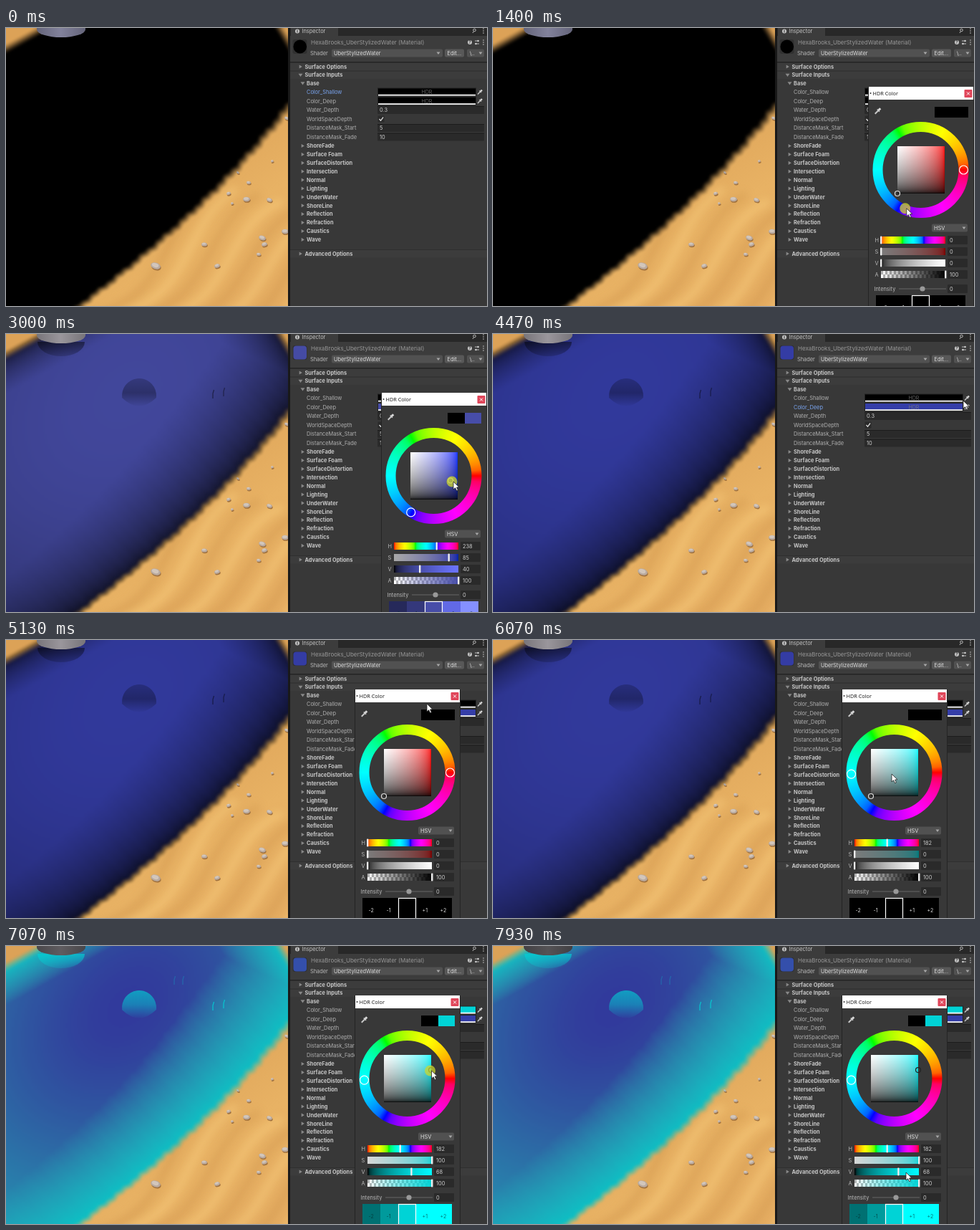
These frames come from a looping animation (672 px wide and 388 px high, 8000 ms). An HTML page with a canvas:

```html
<!DOCTYPE html>
<html lang="en">
<head>
<meta charset="utf-8">
<title>Water material</title>
<style>
html, body { margin: 0; width: 100%; height: 100%; overflow: hidden; background: #383838; }
canvas { display: block; }
</style>
</head>
<body>
<canvas id="stage" width="672" height="388"></canvas>
<script>
const LOOP = 8;
const VIEW_W = 396, H = 388;
const g = document.getElementById('stage').getContext('2d');

// Keys are [time, value...]; values ease between neighbours and hold at the ends.
function track(t, keys) {
  if (t <= keys[0][0]) return keys[0].slice(1);
  for (let i = 1; i < keys.length; i++) {
    const a = keys[i - 1], b = keys[i];
    if (t < b[0]) return mix(a.slice(1), b.slice(1), smooth((t - a[0]) / (b[0] - a[0])));
  }
  return keys[keys.length - 1].slice(1);
}
const clamp = v => Math.min(1, Math.max(0, v));
const smooth = v => { v = clamp(v); return v * v * (3 - 2 * v); };
const mix = (a, b, p) => a.map((v, i) => v + (b[i] - v) * p);

// Colours are linear light; css() converts them for display.
const hsv = (h, s, v) => [5, 3, 1].map(n => {
  const k = (n + h / 60) % 6;
  return v - v * s * Math.max(0, Math.min(k, 4 - k, 1));
});
const encode = v => clamp(v) ** (1 / 2.2);
const toByte = v => Math.round(255 * encode(v));
const css = (c, a = 1) => `rgba(${c.map(toByte)},${a})`;

// Drawing helpers
function rect(x, y, w, h, fill, r = 0) {
  g.fillStyle = fill;
  g.beginPath();
  g.roundRect(x, y, w, h, r);
  g.fill();
}
function frame(x, y, w, h, color, width = 1) {
  g.strokeStyle = color;
  g.lineWidth = width;
  g.strokeRect(x, y, w, h);
}
function text(s, x, y, color = '#b8b8b8', size = 7.4, weight = 400, family = 'Inter') {
  g.font = `${weight} ${size}px ${family}, sans-serif`;
  g.textBaseline = 'middle';
  g.fillStyle = color;
  g.fillText(s, x, y + .5);
}
function line(points, color, width = 1) {
  g.strokeStyle = color;
  g.lineWidth = width;
  g.beginPath();
  points.forEach(([x, y]) => g.lineTo(x, y));
  g.stroke();
}
function poly(points, fill) {
  g.fillStyle = fill;
  g.beginPath();
  points.forEach(([x, y]) => g.lineTo(x, y));
  g.fill();
}
function ring(x, y, r, color, width) {
  g.strokeStyle = color;
  g.lineWidth = width;
  g.beginPath();
  g.arc(x, y, r, 0, 7);
  g.stroke();
}
function disc(x, y, r, fill) {
  g.fillStyle = fill;
  g.beginPath();
  g.arc(x, y, r, 0, 7);
  g.fill();
}
function gradient(x0, y0, x1, y1, colors) {
  const grad = g.createLinearGradient(x0, y0, x1, y1);
  colors.forEach((c, i) => grad.addColorStop(i / (colors.length - 1), c));
  return grad;
}
// Evenly spaced samples of a colour function over 0..1
const ramp = (colorAt, n = 24) => Array.from({ length: n + 1 }, (_, i) => colorAt(i / n));
const down = (x, y, s = 2.5, c = '#a8a8a8') => poly([[x - s, y - s * .6], [x + s, y - s * .6], [x, y + s * .8]], c);
const right = (x, y) => poly([[x - 1.8, y - 2.6], [x + 2.4, y], [x - 1.8, y + 2.6]], '#888');
function dropper(x, y, s = 1) {
  line([[x - 3 * s, y + 3 * s], [x + s, y - s]], '#c8c8c8', 1.5 * s);
  line([[x - .6 * s, y - 2 * s], [x + 2 * s, y + .6 * s]], '#d0d0d0', 1.2 * s);
  line([[x + s, y - s], [x + 3 * s, y - 3 * s]], '#d8d8d8', 2.4 * s);
}

// Beach, drawn once
function makeSand() {
  const c = document.createElement('canvas');
  c.width = VIEW_W; c.height = H;
  const s = c.getContext('2d');
  const base = s.createLinearGradient(230, 150, 390, 388);
  base.addColorStop(0, '#dca257');
  base.addColorStop(.5, '#e8b264');
  base.addColorStop(1, '#e5ad62');
  s.fillStyle = base;
  s.fillRect(0, 0, VIEW_W, H);
  s.filter = 'blur(6px)';
  for (let i = 0; i < 9; i++) {
    s.strokeStyle = i % 2 ? 'rgba(255,214,135,.4)' : 'rgba(190,130,62,.28)';
    s.lineWidth = 10;
    s.beginPath();
    s.moveTo(120 + i * 38, 400);
    s.bezierCurveTo(235 + i * 26, 375, 215 + i * 32, 270, 290 + i * 32, 215 + i * 9);
    s.stroke();
  }
  s.filter = 'none';
  const shells = [[372, 186, 2], [339, 216, 3], [324, 202, 2], [311, 231, 3], [336, 239, 5], [368, 240, 4],
    [316, 245, 2], [277, 302, 4], [209, 332, 7], [295, 332, 4], [353, 316, 3], [358, 293, 5],
    [361, 302, 4], [390, 284, 5], [392, 126, 3]];
  shells.forEach(([x, y, r], i) => {
    for (const [dy, fill] of [[1.6, '#a0723f'], [0, '#b9aaa0'], [-1, '#d2c6bb']]) {
      s.fillStyle = fill;
      s.beginPath();
      s.ellipse(x + dy * .5, y + dy, r * (dy < 0 ? .7 : 1), r * (dy < 0 ? .4 : .65), i % 3 * .3 - .3, 0, 7);
      s.fill();
    }
  });
  return c;
}
const sand = makeSand();

// Water at half size: depth and coverage are fixed, only the colours change.
const waterCanvas = document.createElement('canvas');
waterCanvas.width = VIEW_W / 2; waterCanvas.height = H / 2;
const waterCtx = waterCanvas.getContext('2d');
const waterImage = waterCtx.createImageData(VIEW_W / 2, H / 2);
const depth = new Uint8Array(VIEW_W * H / 4);
for (let i = 0; i < depth.length; i++) {
  const x = i % (VIEW_W / 2) * 2 + 1, y = Math.floor(i / (VIEW_W / 2)) * 2 + 1;
  const dy = y - 112;
  const shoreX = 395 - .764 * dy - .00104 * dy * Math.max(0, dy);
  const wobble = .7 * Math.sin((x - y) / 3.3) + .9 * Math.sin((x - y) / 9);
  const near = (shoreX - x) * .72 + wobble;
  const far = (y - 28 + .55 * x) * .87;
  const side = (383 + .6 * y - x) * .86;
  const edge = Math.min(near, far, side);
  const along = ((x - 170) * .716 - (y - 85) * .698) / 400;
  const across = ((x - 170) * .698 + (y - 85) * .716) / 290;
  const bank = clamp(Math.min(near, far * 2.5, side * 1.6) / 120) ** .8;
  depth[i] = 255 * bank * (1 - .6 * clamp(along * along + across * across));
  waterImage.data[i * 4 + 3] = 255 * smooth((edge + 7) / 16);
}
function drawWater(shallow, deep) {
  const colors = ramp(p => mix(shallow, deep, p).map(v => toByte(v * .84)), 255);
  const px = waterImage.data;
  for (let i = 0; i < depth.length; i++) {
    const c = colors[depth[i]];
    px[i * 4] = c[0]; px[i * 4 + 1] = c[1]; px[i * 4 + 2] = c[2];
  }
  waterCtx.putImageData(waterImage, 0, 0);
  g.drawImage(waterCanvas, 0, 0, VIEW_W, H);
}

function drawScene(t, shallow, deep) {
  g.drawImage(sand, 0, 0);
  drawWater(shallow, deep);
  const tint = a => css(shallow, a);
  const lit = clamp(shallow[2] * 2);

  // Submerged part of the post, ball and reeds
  g.fillStyle = gradient(0, 8, 0, 32, [tint(.5 + .25 * lit), tint(.15)]);
  g.beginPath();
  g.ellipse(77, 11, 33, 20, 0, 0, Math.PI);
  g.fill();
  g.fillStyle = gradient(0, 62, 0, 102, [tint(.2 + .45 * lit), tint(.32 + .13 * lit), tint(0)]);
  g.beginPath();
  g.arc(186, 86, 24, Math.PI * .96, Math.PI * 2.04);
  g.quadraticCurveTo(186, 112, 162, 89);
  g.fill();
  for (const [x, y, a] of [[289, 78, .45 + .35 * lit], [304, 75, .4 + .4 * lit], [235, 42, .25 * lit], [247, 42, .25 * lit]])
    line([[x + 1.5, y], [x, y + 5], [x, y + 12]], tint(a), 1.3);

  // Post above the water
  const [shade] = track(t, [[2, 0], [2.6, 1], [6.1, 1], [6.4, 2.2], [7.9, 2.6]]);
  const tone = k => shade < 1 ? `rgb(${[118 + 22 * shade, 118 + 18 * shade, 142].map(v => v * k)})`
    : `rgb(${[140, 136, 142].map(v => v * k * (1.28 - .28 * shade))})`;
  g.fillStyle = gradient(42, 0, 111, 0, [tone(.85), tone(1.1), tone(.85)]);
  g.beginPath();
  g.ellipse(77, 2, 34, 11, 0, 0, Math.PI);
  g.lineTo(43, 0);
  g.lineTo(111, 0);
  g.fill();
}

const groups = ['ShoreFade', 'Surface Foam', 'SurfaceDistortion', 'Intersection', 'Normal', 'Lighting',
  'UnderWater', 'ShoreLine', 'Reflection', 'Refraction', 'Caustics', 'Wave'];

function drawInspector(t, shallow, deep, focus) {
  rect(394, 0, 278, H, '#383838');
  rect(394, 0, 278, 11, '#282828');
  rect(398, 0, 66, 12, '#3c3c3c');
  rect(397, 11, 275, 36, '#3c3c3c');
  rect(397, 47, 275, 1, '#252525');
  rect(394, 0, 3, H, '#191919');
  disc(407, 4.5, 3, '#c4c4c4');
  rect(406.5, 2.5, 1, 4, '#333');
  text('Inspector', 413.5, 4, '#c4c4c4');
  ring(654.5, 3, 1.8, '#bbb', 1);
  line([[653.5, 4.5], [652, 7]], '#bbb');
  for (const [x, y] of [[667, 4], [667, 20]])
    for (const d of [-3, 0, 3]) disc(x, y + d, .8, '#c4c4c4');

  // Header
  rect(400.5, 16, 20, 20, '#303030', 3);
  rect(401.5, 16.5, 18.5, 19, css(mix(shallow, deep, .95)), t > 2.7 ? 4 : 9.5);
  text('HexaBrooks_UberStylizedWater (Material)', 426, 20, '#989898', 8);
  disc(648, 20, 3, '#c4c4c4');
  text('?', 646.3, 20, '#383838', 6, 700);
  for (const y of [18, 22]) line([[655, y], [661, y]], '#bbb');
  disc(659.5, 18, 1.2, '#ccc');
  disc(656.5, 22, 1.2, '#ccc');
  text('Shader', 425, 35);
  rect(455, 29.5, 155, 11, '#515151', 2);
  text('UberStylizedWater', 458, 35, '#dcdcdc');
  down(604, 35);
  rect(613, 29.5, 27, 11, '#585858', 2);
  text('Edit...', 616.5, 35, '#e0e0e0');
  rect(644, 29.5, 24, 11, '#515151', 2);
  text('\\..', 648, 35, '#e0e0e0');
  down(663, 35);

  // Foldouts
  const bold = (s, x, y) => text(s, x, y, '#c6c6c6', 7.4, 700);
  for (const y of [54, 65.5, 315]) {
    rect(397, y - 5.5, 275, 11, '#3c3c3c');
    rect(397, y - 6, 275, 1, '#2e2e2e');
  }
  right(411.5, 54);
  bold('Surface Options', 417.5, 54);
  down(411.5, 65.5, 3, '#888');
  bold('Surface Inputs', 417.5, 65.5);
  down(414.5, 77, 3, '#888');
  bold('Base', 420, 77);
  groups.forEach((name, i) => {
    const y = 164.5 + i * 11.9;
    right(414.5, y);
    bold(name, 420, y);
  });
  right(411.5, 315);
  bold('Advanced Options', 417.5, 315);

  // Properties
  [['Color_Shallow', shallow], ['Color_Deep', deep]].forEach(([name, color], i) => {
    const y = 89.5 + i * 12.5;
    text(name, 420, y, focus === i ? '#7aa5f0' : '#b0b0b0');
    rect(519, y - 6, 138, 12, '#222');
    rect(520, y - 5, 136, 8.5, css(color));
    rect(520, y + 3.3, 136, 1.8, '#fff');
    text('HDR', 580.5, y, 'rgba(128,128,128,.8)', 7);
    dropper(662, y);
  });
  [['Water_Depth', '0.3'], ['WorldSpaceDepth'], ['DistanceMask_Start', '5'], ['DistanceMask_Fade', '10']].forEach(([name, value], i) => {
    const y = 114.5 + i * 12.5;
    text(name, 420, y, '#b0b0b0');
    if (value) {
      rect(519, y - 5.5, 149, 11, '#2a2a2a', 1);
      rect(519, y - 5.5, 149, 1, '#1c1c1c');
      text(value, 522, y, '#d0d0d0');
    } else {
      rect(519.5, y - 4.5, 9, 9, '#2a2a2a', 1);
      line([[521.5, y], [523.5, y + 2.3], [527, y - 2.5]], '#ddd', 1.3);
    }
  });
}

const rainbow = ramp(p => css(hsv(360 * p, 1, 1)), 48);
const darken = ramp(p => `rgba(0,0,0,${1 - encode(1 - p)})`, 48);

function drawPicker(hue, s, v, old) {
  const color = hsv(hue, s, v);
  rect(-1, 0, 148, 340, '#242424');
  rect(0, 0, 146, 340, '#383838');
  rect(0, 0, 146, 18, '#fff');
  disc(2.5, 9, 1, '#333');
  text('HDR Color', 5.5, 9, '#222', 7.3, 400, 'Noto Sans');
  rect(133.5, 4, 11, 11, '#e0465a', 1);
  line([[137, 7.5], [141, 11.5]], '#fff');
  line([[141, 7.5], [137, 11.5]], '#fff');

  dropper(12.5, 34, 1.25);
  rect(92, 28, 24, 15, css(old));
  rect(116, 28, 23, 15, css(color));

  // Hue ring and saturation/value square
  const wheel = g.createConicGradient(0, 72.5, 116);
  rainbow.forEach((c, i) => wheel.addColorStop(1 - i / (rainbow.length - 1), c));
  ring(72.5, 116, 60, wheel, 14);
  const a = hue * Math.PI / 180;
  ring(72.5 + 60 * Math.cos(a), 116 - 60 * Math.sin(a), 6, '#fff', 1.2);
  rect(40, 83, 66, 66, gradient(40, 0, 106, 0, ramp(p => css(hsv(hue, p, 1)), 48)));
  rect(40, 83, 66, 66, gradient(0, 83, 0, 149, darken));
  ring(40 + 66 * s, 149 - 66 * v, 3.5, v > .5 ? '#222' : '#ddd', 1.2);

  rect(88, 191.5, 50, 11, '#515151', 2);
  text('HSV', 91, 197, '#e0e0e0');
  down(133, 197);

  // Channel sliders
  const channels = [
    ['H', hue / 360, hue, rainbow],
    ['S', s, s * 100, ramp(p => css(hsv(hue, p, Math.max(v, .2))))],
    ['V', v, v * 100, ramp(p => css(hsv(hue, s, p)))],
    ['A', 1, 100, [css(color, 0), css(color)]]
  ];
  channels.forEach(([name, pos, value, colors], i) => {
    const y = 214 + i * 16;
    text(name, 8.5, y);
    if (name === 'A')
      for (let k = 0; k < 60; k++)
        rect(17 + k % 30 * 3, y - 5 + Math.floor(k / 30) * 5, 3, 5, (k + Math.floor(k / 30)) % 2 ? '#fff' : '#b4b4b4');
    rect(17, y - 5, 90, 10, gradient(17, 0, 107, 0, colors));
    rect(16 + 90 * pos, y - 5.5, 2.4, 11, '#eee', 1);
    rect(110, y - 6, 28, 12, '#2a2a2a', 1);
    text(Math.round(value), 113, y, '#d0d0d0');
  });
  text('Intensity', 7.5, 282);
  line([[42, 282], [108, 282]], '#666', 1.2);
  disc(75, 282, 3.6, '#999');
  rect(110, 276, 28, 12, '#2a2a2a', 1);
  text('0', 113, 282, '#d0d0d0');

  // Exposure steps
  for (let i = -2; i <= 2; i++) {
    const x = 60 + i * 25;
    rect(x, 291, 25, 40, css(color.map(c => c * 2 ** i)));
    if (i) text((i > 0 ? '+' : '') + i, x + 8.5, 308.5, v > .1 ? 'rgba(0,40,40,.65)' : '#ddd', 7);
  }
  frame(60.5, 291.5, 24, 45, '#fff', 1.2);
}

function drawCursor(t) {
  if (t < .13) return;
  const [x, y] = track(t, [[.13, 655, 150], [.65, 590, 101], [.95, 590, 101], [1.25, 600, 257], [1.5, 566, 249],
    [1.7, 566, 249], [1.95, 570, 216], [2.2, 583, 205], [2.53, 596, 204], [3, 625, 206], [3.6, 627, 205],
    [4.2, 664, 91], [4.33, 663, 91], [4.47, 657, 93], [4.95, 588, 89], [5.15, 588, 89], [5.45, 501, 187],
    [5.6, 501, 187], [6.07, 557, 187], [6.13, 557, 187], [6.47, 592, 176], [6.8, 595, 174], [7.35, 594, 174],
    [7.93, 577, 316]]);
  const presses = [[.68, .8], [1.4, 1.68], [1.93, 3.6], [4.22, 4.32], [5, 5.1], [5.46, 5.58], [6.1, 7.35]];
  if (presses.some(([from, to]) => t >= from && t < to)) disc(x - 2, y, 7.5, 'rgba(205,215,45,.75)');
  const shape = [[0, 0], [0, 11], [2.6, 8.7], [4.6, 12.8], [6.4, 12], [4.6, 8], [8, 7.8], [0, 0]].map(([a, b]) => [x + a, y + b]);
  poly(shape, '#fff');
  line(shape, '#222', .8);
}

function draw(t) {
  const deepOpen = t >= .75 && t < 4.3, shallowOpen = t >= 5.1;
  const [deepHue] = track(t, [[1.4, 0], [1.6, 238]]);
  const [deepS, deepV] = track(t, [[1.93, 0, 0], [2.2, .16, .34], [2.53, .31, .39], [3, .85, .4], [3.4, .92, .4]]);
  const [s, v] = track(t, [[6.09, 0, 0], [6.13, .45, .47], [6.47, .92, .65], [6.8, 1, .68]]);
  const hue = t < 5.48 ? 0 : 182;
  const deep = hsv(deepHue, deepS, deepV), shallow = hsv(hue, s, v);
  const focus = t < .7 ? 0 : t < .75 || t >= 4.3 && t < 5 ? 1 : t >= 5 && t < 5.1 ? 0 : -1;

  drawScene(t, shallow, deep);
  drawInspector(t, shallow, deep, focus);
  g.save();
  if (deepOpen) {
    g.translate(525, 82);
    drawPicker(deepHue, deepS, deepV, [0, 0, 0]);
  } else if (shallowOpen) {
    g.translate(488, 69);
    drawPicker(hue, s, v, [0, 0, 0]);
  }
  g.restore();
  drawCursor(t);
}

function tick(now) {
  draw(now / 1000 % LOOP);
  requestAnimationFrame(tick);
}
requestAnimationFrame(tick);
</script>
</body>
</html>
```
